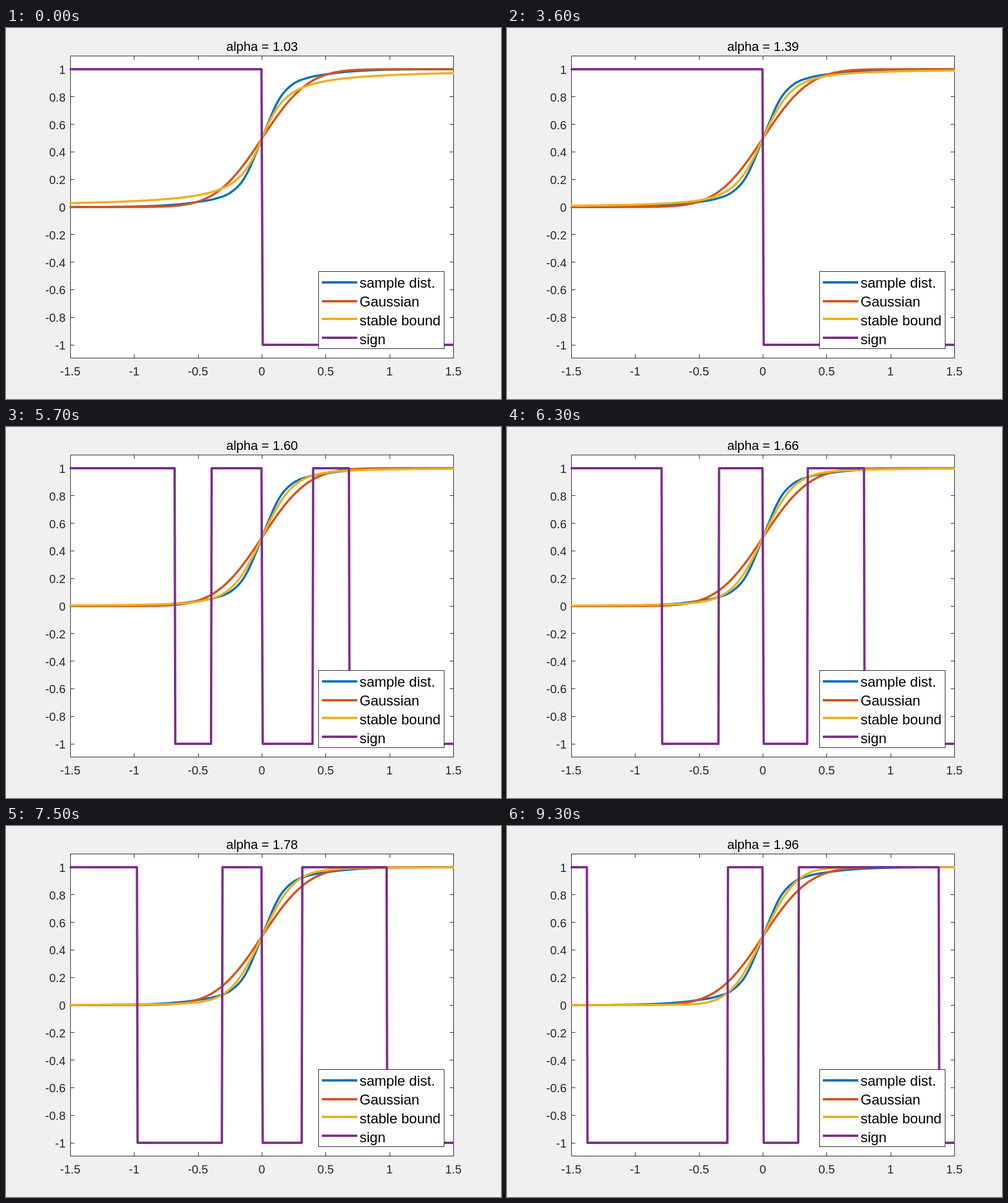
These frames come from a looping animation (840 by 630 pixels, 9.6 s). An HTML page with a canvas:

```html
<!DOCTYPE html>
<html>
<head>
<meta charset="utf-8">
<style>
html, body { margin: 0; width: 100%; height: 100%; overflow: hidden; background: #f0f0f0; }
canvas { display: block; }
</style>
</head>
<body>
<canvas id="stage" width="840" height="630"></canvas>
<script>
const ctx = document.getElementById('stage').getContext('2d');
const STEPS = 32, STEP_MS = 300;
const BLUE = '#0072bd', RED = '#d95319', GOLD = '#edb120', PURPLE = '#7e2f8e', INK = '#262626';
const SCALE = 0.145, SIGMA = 0.286;
const HALF = 300, DX = 1.5 / HALF;
const px = x => 434.6 + 216.7 * x;
const py = y => 304 - 234 * y;

// Symmetric alpha-stable CDF, by inverting its characteristic function
function stableCdf(alpha, x) {
  const n = 600, h = 30 ** (1 / alpha) / n, u = x / SCALE;
  let sum = 0;
  for (let i = 0; i < n; i++) {
    const t = (i + 0.5) * h;
    sum += Math.sin(t * u) / t * Math.exp(-(t ** alpha));
  }
  return 0.5 + sum * h / Math.PI;
}

function gaussCdf(x) {
  const n = 60, h = x / SIGMA / n;
  let sum = 0;
  for (let i = 0; i < n; i++) sum += Math.exp(-(((i + 0.5) * h) ** 2) / 2);
  return 0.5 + sum * h / Math.sqrt(2 * Math.PI);
}

// Cubic Hermite curve through [x, y] knots
function spline(knots, x) {
  let i = 0;
  while (i < knots.length - 2 && x > knots[i + 1][0]) i++;
  const slope = k => {
    const a = knots[Math.max(k - 1, 0)], b = knots[Math.min(k + 1, knots.length - 1)];
    return (b[1] - a[1]) / (b[0] - a[0]);
  };
  const [x0, y0] = knots[i], [x1, y1] = knots[i + 1];
  const w = x1 - x0, t = (x - x0) / w, s = 1 - t;
  return s * s * ((1 + 2 * t) * y0 + t * w * slope(i)) +
         t * t * ((3 - 2 * t) * y1 - s * w * slope(i + 1));
}

// Outside the core, the sample curve is given by the alpha whose stable curve meets it at x
const EDGE = 0.279;
const meeting = [[EDGE, 1.96], [0.3115, 1.78], [0.3484, 1.66], [0.473, 1.54], [0.547, 1.54],
                 [0.7926, 1.66], [0.976, 1.78], [1.3775, 1.96], [1.6, 2]];
const core = [[-0.05, 0.385], [0, 0.5], [0.05, 0.615], [0.1, 0.723], [0.15, 0.806], [0.2, 0.86],
              [0.25, 0.897], [EDGE, stableCdf(1.96, EDGE)], [0.32, 0.926]];
const sampleCdf = x => x < EDGE ? spline(core, x) : stableCdf(spline(meeting, x), x);

// Values for x >= 0; the left half follows by symmetry
const half = f => Array.from({ length: HALF + 1 }, (_, i) => f(i * DX));
const sample = half(sampleCdf), gauss = half(gaussCdf);

function segment(x0, y0, x1, y1, color, width) {
  ctx.strokeStyle = color;
  ctx.lineWidth = width;
  ctx.beginPath();
  ctx.moveTo(x0, y0);
  ctx.lineTo(x1, y1);
  ctx.stroke();
}

function label(text, x, y, size, align, color) {
  ctx.font = size + 'px "Liberation Sans", Arial, sans-serif';
  ctx.textAlign = align;
  ctx.fillStyle = color;
  ctx.fillText(text, x, y);
}

function box(x, y, w, h) {
  ctx.fillStyle = '#fff';
  ctx.fillRect(x, y, w, h);
  ctx.strokeStyle = INK;
  ctx.lineWidth = 1;
  ctx.strokeRect(x, y, w, h);
}

function curve(values, mirror, color, width) {
  ctx.strokeStyle = color;
  ctx.lineWidth = width;
  ctx.beginPath();
  for (let i = -HALF; i <= HALF; i++) {
    const v = values[Math.abs(i)];
    ctx.lineTo(px(i * DX), py(i < 0 ? mirror(v) : v));
  }
  ctx.stroke();
}

function axes() {
  box(109.5, 47.5, 650, 513);
  for (let i = -3; i <= 3; i++) {
    const x = Math.floor(px(i / 2)) + 0.5;
    segment(x, 47, x, 54, INK, 1);
    segment(x, 554, x, 561, INK, 1);
    label(String(i / 2), px(i / 2) - 0.5, 590, 20, 'center', INK);
  }
  for (let i = -5; i <= 5; i++) {
    const y = Math.floor(py(i / 5)) + 0.5;
    segment(109, y, 116, y, INK, 1);
    segment(753, y, 760, y, INK, 1);
    label(String(i / 5), 101, py(i / 5) + 8, 20, 'right', INK);
  }
}

function legend() {
  box(530.5, 413.5, 213, 131);
  [['sample dist.', BLUE, 432], ['Gaussian', RED, 464],
   ['stable bound', GOLD, 494], ['sign', PURPLE, 526]].forEach(([text, color, y], i) => {
    segment(536, y, 596, y, color, 4);
    label(text, 600, 441 + 32 * i, 24, 'left', '#000');
  });
}

function draw(step) {
  const alpha = 1.03 + 0.03 * step;
  const stable = half(x => stableCdf(alpha, x));
  const sign = stable.map((v, i) => i ? Math.sign(v - sample[i]) : 0);
  const flip = v => 1 - v;

  ctx.fillStyle = '#f0f0f0';
  ctx.fillRect(0, 0, 840, 630);
  axes();
  label('alpha = ' + alpha.toFixed(2), 434.5, 39, 22, 'center', '#000');

  ctx.save();
  ctx.beginPath();
  ctx.rect(108, 47, 652, 514);
  ctx.clip();
  ctx.lineJoin = ctx.lineCap = 'round';
  curve(sample, flip, BLUE, 3.7);
  curve(gauss, flip, RED, 3.7);
  curve(stable, flip, GOLD, 3.7);
  curve(sign, v => -v, PURPLE, 4);
  ctx.restore();
  legend();
}

let shown = -1;
function tick() {
  const step = Math.floor(performance.now() / STEP_MS) % STEPS;
  if (step !== shown) draw(shown = step);
  requestAnimationFrame(tick);
}
tick();
</script>
</body>
</html>
```
